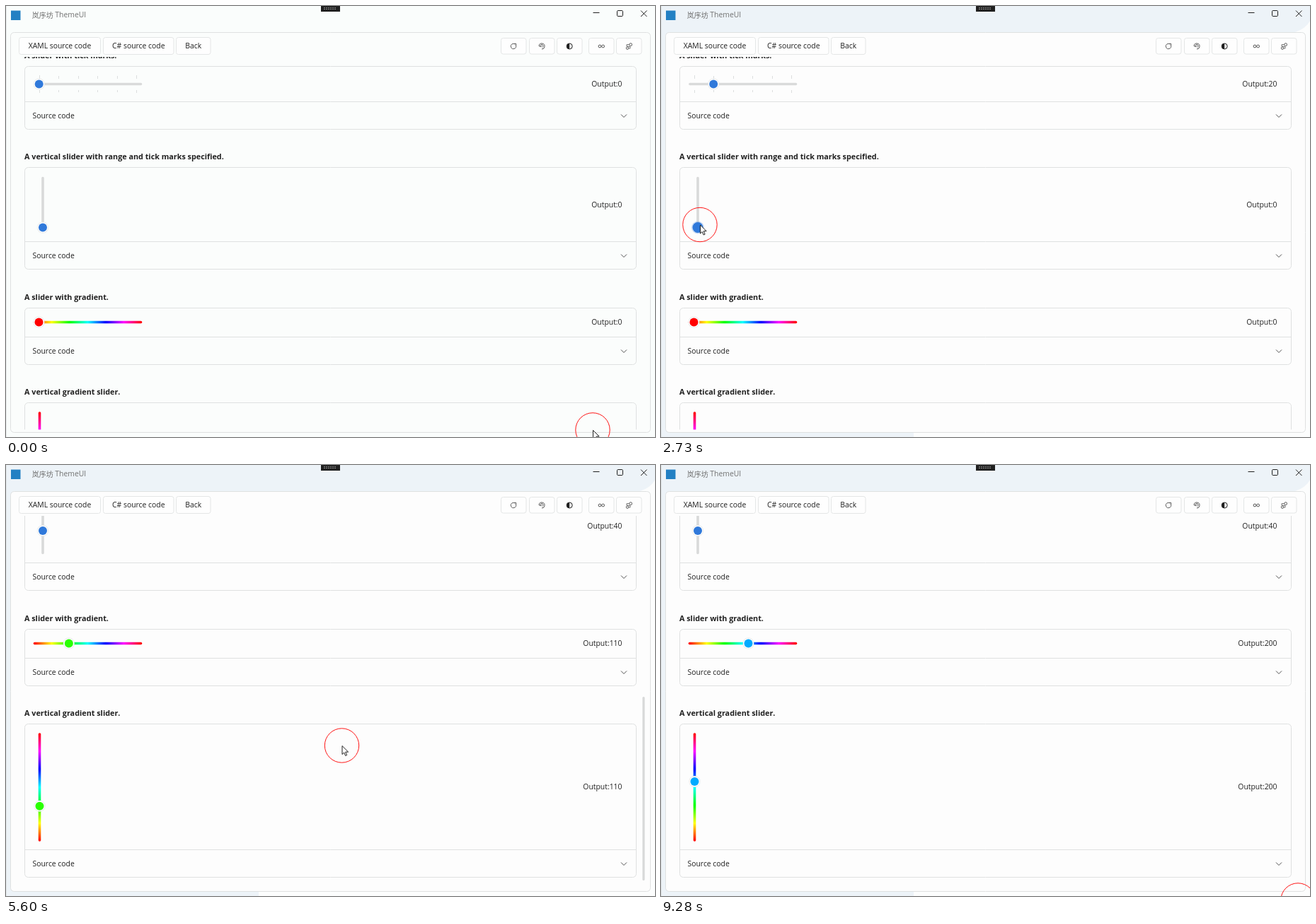
Write an HTML page with a canvas that moves like this. It is 917x610 px and loops after 9.33 s.

```html
<!DOCTYPE html>
<html lang="en">
<head>
<meta charset="utf-8">
<title>Sliders</title>
<style>
html, body { margin: 0; width: 100%; height: 100%; overflow: hidden; background: #fafdfc; }
canvas { display: block; width: 917px; height: 610px; }
</style>
</head>
<body>
<canvas id="stage" width="917" height="610"></canvas>
<script>
const ctx = document.getElementById('stage').getContext('2d');
const LOOP = 9330, FULL_SCROLL = 195;
const BODY = '10.4px "Open Sans", "Noto Sans", sans-serif';
const HEADING = '700 10.8px "Open Sans", "Noto Sans", sans-serif';
const INK = '#202020', GRAY = '#555', LINE = '#dfe1e1', TRACK = '#d9dada', BLUE = '#3079da';
const HUE_STEP = 0.385, TICK_STEP = 27.5, VERTICAL_STEP = 12.75;

// Start and end of each drag
const DRAG = { ticked: [900, 1980], vertical: [2730, 3130], hue: [3950, 5003], hueUp: [6560, 7950] };

// Pointer moves: from time, to time, x, y
const MOVES = [
  [50, 900, 36, 113],
  [900, 1320, 100, 111],
  [1830, 1980, 72.5, 115],
  [2130, 2730, 55, 309.5],
  [2730, 2980, 62, 265],
  [3080, 3130, 62, 276],
  [3330, 3950, 45, 448],
  [3950, 4430, 122, 444],
  [4590, 4890, 86, 445.5],
  [4990, 5350, 474.5, 397],
  [5600, 6460, 45, 484],
  [6560, 7190, 48, 474.2],
  [7690, 7950, 47, 449.4],
  [8010, 8360, 877, 563]
];

const clamp = (v, lo = 0, hi = 1) => Math.max(lo, Math.min(hi, v));
const smooth = v => v * v * (3 - 2 * v);
const between = (t, [a, b]) => t >= a && t < b;
const crisp = v => Math.floor(v) + 0.5;
const hue = v => `hsl(${v}, 100%, 50%)`;

function pointerAt(t) {
  let x = 829, y = 600;
  for (const [from, to, nx, ny] of MOVES) {
    const k = smooth(clamp((t - from) / (to - from)));
    x += (nx - x) * k;
    y += (ny - y) * k;
  }
  return { x, y };
}

const dragAt = (t, drag) => pointerAt(clamp(t, ...drag));
const snap = distance => 20 * Math.max(0, Math.floor(distance));

function valuesAt(t) {
  const level = t < DRAG.hueUp[0]
    ? dragAt(t, DRAG.hue).x - 45.2
    : 526.4 - dragAt(t, DRAG.hueUp).y;
  return {
    ticked: snap((dragAt(t, DRAG.ticked).x - 44) / TICK_STEP),
    vertical: snap((311 - dragAt(t, DRAG.vertical).y) / VERTICAL_STEP),
    hue: Math.max(0, Math.round(level / HUE_STEP))
  };
}

function scrollAt(t) {
  if (t >= 5600) return FULL_SCROLL;
  return (FULL_SCROLL - 12) * (1 - (1 - clamp((t - 5250) / 250)) ** 2);
}

function text(s, x, y, font = BODY, color = INK, align = 'left') {
  ctx.font = font;
  ctx.fillStyle = color;
  ctx.textAlign = align;
  ctx.fillText(s, x, y);
}

function stroke(color, width = 1) {
  ctx.strokeStyle = color;
  ctx.lineWidth = width;
  ctx.stroke();
}

function box(x, y, w, h, r, fill, border) {
  ctx.beginPath();
  ctx.roundRect(x, y, w, h, r);
  if (fill) { ctx.fillStyle = fill; ctx.fill(); }
  if (border) stroke(border);
}

function lines(points, color, width) {
  ctx.beginPath();
  for (const [x, y] of points) ctx.lineTo(x, y);
  stroke(color, width);
}

function disc(x, y, r, color) {
  ctx.beginPath();
  ctx.arc(x, y, r, 0, Math.PI * 2);
  ctx.fillStyle = color;
  ctx.fill();
}

// Angles in turns
function arc(x, y, r, from = 0, to = 1, color = GRAY) {
  ctx.beginPath();
  ctx.arc(x, y, r, from * Math.PI * 2, to * Math.PI * 2);
  stroke(color);
}

function track(x0, y0, x1, y1, color) {
  ctx.lineCap = 'round';
  lines([[x0, y0], [x1, y1]], color, 3.6);
  ctx.lineCap = 'butt';
}

function rainbow(x0, y0, x1, y1) {
  const g = ctx.createLinearGradient(x0, y0, x1, y1);
  for (let i = 0; i <= 6; i++) g.addColorStop(i / 6, hue(i * 60));
  return g;
}

function thumb(x, y, color, pressed) {
  if (pressed) {
    ctx.globalAlpha = 0.25;
    disc(x, y, 9, color);
    ctx.globalAlpha = 1;
    disc(x, y, 7.4, color);
  } else {
    disc(x, y, 8, '#e4e6e6');
    disc(x, y, 7.3, '#fff');
    disc(x, y, 6, color);
  }
}

function card(title, value, y, height) {
  const top = crisp(y), divider = crisp(y + height), bottom = crisp(y + height + 39);
  const middle = crisp((divider + bottom) / 2);
  text(title, 26, top - 11.5, HEADING);
  box(26.5, top, 864, bottom - top, 5, null, LINE);
  lines([[26.5, divider], [890.5, divider]], LINE);
  text('Source code', 37.5, middle + 3.8);
  lines([[869, middle - 2], [873, middle + 2], [877, middle - 2]], '#505050');
  text('Output:' + value, 870.5, y + height / 2 + 3.8, BODY, INK, 'right');
}

function tickMarks() {
  for (let i = 0; i < 6; i++) {
    const x = crisp(47 + i * TICK_STEP), extra = i % 5 ? 0 : 1;
    lines([[x, 99 - extra], [x, 103]], '#dcdede');
    lines([[x, 119], [x, 122 + extra]], '#dcdede');
  }
}

function content(t) {
  const value = valuesAt(t);
  const cards = [
    ['A slider with tick marks.', value.ticked, 50],
    ['A vertical slider with range and tick marks specified.', value.vertical, 105],
    ['A slider with gradient.', value.hue, 41],
    ['A vertical gradient slider.', value.hue, 178.4]
  ];
  let y = 85.5;
  for (const [title, output, height] of cards) {
    card(title, output, y, height);
    y += height + 93.3;
  }

  tickMarks();
  track(41, 110.5, 190.5, 110.5, TRACK);
  thumb(46.7 + value.ticked / 20 * TICK_STEP, 110.5, BLUE, between(t, DRAG.ticked));

  track(52, 243.5, 52, 319.5, TRACK);
  thumb(52, 313.5 - value.vertical / 20 * VERTICAL_STEP, BLUE, between(t, DRAG.vertical));

  track(40.5, 447.5, 190.5, 447.5, rainbow(39, 0, 192, 0));
  thumb(46.5 + value.hue * HUE_STEP, 447.5, hue(value.hue), between(t, DRAG.hue));

  track(47.5, 576, 47.5, 726, rainbow(0, 727.5, 0, 574.5));
  thumb(47.5, 720 - value.hue * HUE_STEP, hue(value.hue), between(t, DRAG.hueUp));
}

function icons() {
  arc(717, 57, 3.6, -0.05, 0.85);
  lines([[718, 53.3], [720.6, 53.3], [720.6, 56]], GRAY);

  arc(757, 57, 4, 0.52, 1.25);
  arc(757, 56.6, 2, 0.5, 1.2);
  lines([[753, 56.5], [755, 57.5], [757, 57]], GRAY);

  arc(796.2, 57, 4, 0, 1, INK);
  ctx.beginPath();
  ctx.arc(796.2, 57, 4, Math.PI / 2, Math.PI * 1.5);
  ctx.fillStyle = INK;
  ctx.fill();

  arc(839, 57, 1.9);
  arc(843.6, 57, 1.9);

  arc(882.6, 54.6, 1.9);
  arc(878, 59.6, 1.7);
  lines([[880.5, 54.6], [877, 54.6], [877, 57], [882, 57.6], [882, 60], [880, 60]], GRAY, 0.8);
}

function backdrop(tinted) {
  ctx.fillStyle = tinted ? '#edf3f8' : '#fafdfc';
  ctx.fillRect(0, 0, 917, 610);
  if (tinted) {
    ctx.fillStyle = '#fcfdfd';
    ctx.beginPath();
    ctx.moveTo(896, 37);
    ctx.quadraticCurveTo(911, 32, 917, 21);
    ctx.lineTo(917, 610);
    ctx.lineTo(896, 610);
    ctx.fill();
    ctx.fillRect(357, 603, 560, 7);
  }
  ctx.fillStyle = '#d9dddd';
  ctx.fillRect(0, 0, 0.6, 610);
  box(6.5, 37.5, 904, 566, 5, tinted ? '#fdfdfd' : '#fbfdfc', LINE);
}

function button(x, y, w, h, label) {
  box(x, y, w, h, 3, '#fefefe', '#e4e6e6');
  if (label) text(label, x + w / 2, 60.2, BODY, INK, 'center');
}

function chrome() {
  box(7, 6.5, 13.5, 13.5, 0, '#2380c3');
  text('岚序坊', 36.7, 16.5, '10px "Noto Sans CJK SC", "Noto Sans CJK", sans-serif', '#707070');
  text('ThemeUI', 69.3, 16.3, BODY, '#707070');

  box(445, -1, 27, 9, 0, INK);
  ctx.fillStyle = '#858585';
  for (let x = 449; x < 467; x += 3) {
    ctx.fillRect(x, 2, 2, 1);
    ctx.fillRect(x, 4, 2, 1);
  }

  lines([[829.5, 9.5], [838.5, 9.5]], INK);
  box(863.5, 6.5, 8, 8, 1.2, null, INK);
  lines([[897, 6.5], [905.5, 15]], INK);
  lines([[905.5, 6.5], [897, 15]], INK);

  button(18.5, 44.5, 115, 24, 'XAML source code');
  button(137.5, 44.5, 99.5, 24, 'C# source code');
  button(240.5, 44.5, 48.5, 24, 'Back');
  for (const x of [699.5, 739.5, 778.5, 823.5, 862.5]) button(x, 45.5, 35.5, 22.5);
  icons();
}

function scrollbar(t, scroll) {
  if (!between(t, [5250, 6460])) return;
  ctx.globalAlpha = 1 - clamp((t - 6200) / 260);
  box(899.3, 328 - (FULL_SCROLL - scroll) * 0.49, 3.2, 260, 1.6, '#d8d9d9');
  ctx.globalAlpha = 1;
}

function pointer(t) {
  const away = between(t, [8410, 8860]) || between(t, [9010, 9160]);
  if (away) return;
  const { x, y } = t < 8410 ? pointerAt(t) : { x: 900, y: 616 };
  arc(x, y, 24.2, 0, 1, '#ff1414');
  ctx.save();
  ctx.translate(x + 0.5, y + 0.5);
  ctx.beginPath();
  for (const p of [[0, 0], [0, 12], [2.7, 9.5], [4.7, 14], [6.6, 13.1], [4.7, 8.7], [8.6, 8.6]]) ctx.lineTo(...p);
  ctx.closePath();
  ctx.fillStyle = '#fff';
  ctx.fill();
  stroke(INK);
  ctx.restore();
}

function draw(t) {
  const scroll = scrollAt(t);
  backdrop(t >= 1160);
  ctx.save();
  ctx.beginPath();
  ctx.rect(7, 72, 903, 527.5);
  ctx.clip();
  ctx.translate(0, -scroll);
  content(t);
  ctx.restore();
  scrollbar(t, scroll);
  chrome();
  pointer(t);
}

const start = performance.now();
function tick() {
  draw((performance.now() - start) % LOOP);
  requestAnimationFrame(tick);
}
tick();
</script>
</body>
</html>
```
